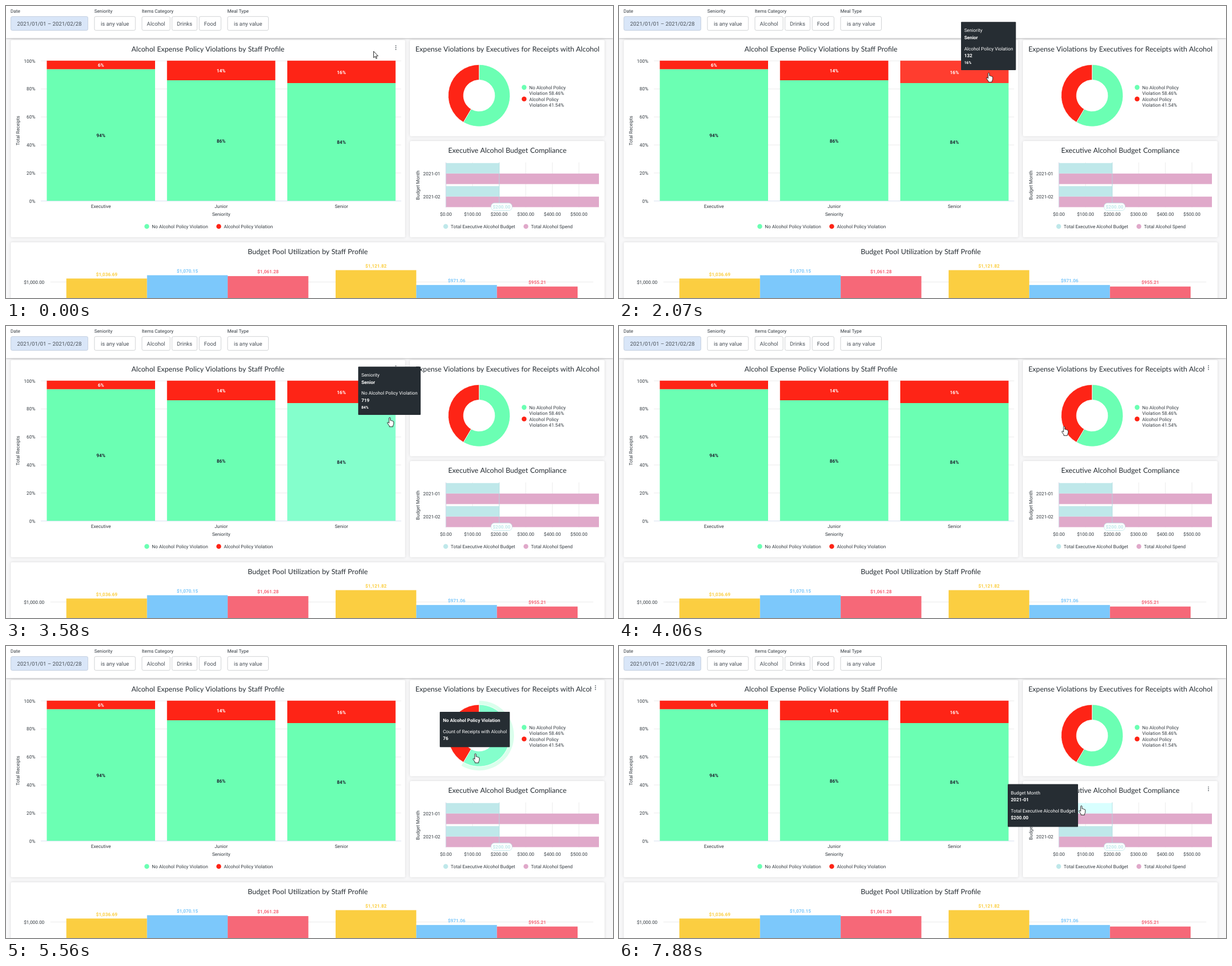
These frames come from a looping animation (1079 by 519 pixels, 8000 ms). An HTML page:

```html
<!DOCTYPE html>
<html lang="en">
<head>
<meta charset="utf-8">
<title>Expense dashboard</title>
<style>
html, body { margin: 0; width: 100%; height: 100%; overflow: hidden; background: #f8f8f9; }
svg { display: block; width: 1079px; height: 519px; }
text { font: 400 8.33px Roboto, Arial, sans-serif; fill: #333a40; text-rendering: geometricPrecision; }
.title { font: 400 12.6px Lato, "Open Sans", sans-serif; word-spacing: .5px; fill: #262d33; }
.chip { font-size: 9.72px; fill: #4a5158; }
.bold { font-weight: 700; }
.mid { text-anchor: middle; }
.end { text-anchor: end; }
.tip { fill: #fff; }
.small { font-size: 6.8px; }
.card { fill: #fff; filter: drop-shadow(0 0 2.5px rgba(0, 0, 0, .13)); }
.head { fill: #fff; filter: drop-shadow(0 1px 1.5px rgba(0, 0, 0, .25)); }
</style>
</head>
<body>
<svg id="stage" viewBox="0 0 1079 519">
  <defs><clipPath id="cut"><rect id="cutBox" y="60" height="40" width="1079"/></clipPath></defs>
</svg>
<script>
const LOOP = 8000;
const GREEN = '#6bffb3', RED = '#fe2416', TEAL = '#bfe8ea', PINK = '#e0a9ca';
const GREEN_HI = '#84ffcc', RED_HI = '#ff3d2f', TEAL_HI = '#d8ffff';
const GRID = '#e6e6e6';
const stage = document.getElementById('stage');

const rect = (x, y, x2, y2, fill, more = '') =>
  `<rect x="${x}" y="${y}" width="${x2 - x}" height="${y2 - y}" fill="${fill}" ${more}/>`;
const line = (x, y, x2, y2, color = GRID) =>
  `<line x1="${x}" y1="${y}" x2="${x2}" y2="${y2}" stroke="${color}" stroke-width=".8"/>`;
const text = (x, y, str, cls = '', more = '') =>
  `<text x="${x}" y="${y}" class="${cls}" ${more}>${str}</text>`;
const dot = (x, y, fill) => `<circle cx="${x}" cy="${y}" r="4.3" fill="${fill}"/>`;
const card = (x, y, x2, y2) => rect(x, y, x2, y2, '#fff', 'rx="2.5" class="card"');
const turned = (x, y, str) => text(0, 0, str, 'mid', `transform="translate(${x} ${y}) rotate(-90)"`);

// Ring segment between two fractions of a full turn
function ring(r1, r2, from, to) {
  const at = (r, f) => {
    const a = f * 2 * Math.PI;
    return `${841 + r * Math.sin(a)} ${159.2 - r * Math.cos(a)}`;
  };
  const big = to - from > .5 ? 1 : 0;
  return `M${at(r2, from)}A${r2} ${r2} 0 ${big} 1 ${at(r2, to)}` +
    `L${at(r1, to)}A${r1} ${r1} 0 ${big} 0 ${at(r1, from)}Z`;
}

function filters() {
  const chip = (x, x2, str, on) =>
    rect(x, 18.7, x2, 43.3, on ? '#d9e6f8' : '#fff', `rx="2.5" stroke="${on ? '#b9c6d8' : '#c4c7ca'}" stroke-width=".8"`) +
    text((x + x2) / 2, 34.6, str, 'chip mid');
  return rect(0, -10, 1079, 57, '#fff', 'class="head"') +
    [[8, 'Date'], [157, 'Seniority'], [241.3, 'Items Category'], [393.5, 'Meal Type']]
      .map(([x, s]) => text(x, 11.8, s)).join('') +
    chip(8.7, 145.6, '2021/01/01 – 2021/02/28', true) +
    chip(157.2, 230, 'is any value') + chip(241.7, 291.6, 'Alcohol') +
    chip(295, 339.7, 'Drinks') + chip(343.4, 382.2, 'Food') + chip(393.9, 466.5, 'is any value');
}

function profileChart() {
  let s = card(8.5, 60.5, 709.5, 411) +
    text(359, 81, 'Alcohol Expense Policy Violations by Staff Profile', 'title mid');
  for (let i = 0; i <= 5; i++) {
    const y = 346.6 - i * 49.8;
    s += line(62, y, 702.5, y, i ? GRID : '#ccd6eb') + text(52, y + 3, i * 20 + '%', 'end');
  }
  const bars = [[72.5, 112.3, 6, 'Executive'], [286.2, 132, 14, 'Junior'], [500, 137, 16, 'Senior']];
  bars.forEach(([x, y, bad, name], i) => {
    const mid = x + 96.2, last = i === 2;
    s += rect(x, y, x + 192.5, 346.3, GREEN, last ? 'id="okBar"' : '') +
      rect(x, 97.2, x + 192.5, y, RED, last ? 'id="badBar"' : '') +
      text(mid, (97.2 + y) / 2 + 3.4, bad + '%', 'bold mid', 'style="fill:#fff"') +
      text(mid, (y + 346.3) / 2 + 3.4, 100 - bad + '%', 'bold mid', 'style="fill:#1d2430"') +
      text(mid, 359.4, name, 'mid');
  });
  return s + turned(24.4, 221.5, 'Total Receipts') + text(382.5, 372.6, 'Seniority', 'mid') +
    dot(250.3, 391.8, GREEN) + text(259.2, 394.8, 'No Alcohol Policy Violation') +
    dot(378.2, 391.8, RED) + text(387.3, 394.8, 'Alcohol Policy Violation');
}

function donutChart() {
  const part = .5846;
  const slice = (id, from, to, fill) =>
    `<path id="${id}Halo" d="${ring(55, 62, from, to)}" fill="${fill}" opacity=".25"/>` +
    `<path id="${id}" d="${ring(27.8, 55, from, to)}" fill="${fill}" stroke="#fff" stroke-width=".8"/>`;
  return card(718, 60.5, 1064, 231.5) +
    `<g clip-path="url(#cut)">${text(891.4, 81, 'Expense Violations by Executives for Receipts with Alcohol', 'title mid')}</g>` +
    slice('okSlice', 0, part, GREEN) + slice('badSlice', part, 1, RED) +
    dot(921, 144.6, GREEN) + text(930, 148, 'No Alcohol Policy') + text(930, 158.3, 'Violation 58.46%') +
    dot(921, 165.2, RED) + text(930, 168.6, 'Alcohol Policy') + text(930, 179, 'Violation 41.54%');
}

function budgetChart() {
  let s = card(718, 240, 1064, 411) + text(891.2, 260.6, 'Executive Alcohol Budget Compliance', 'title mid');
  for (let i = 0; i <= 5; i++) {
    const x = 782 + i * 47.3;
    s += line(x, 278, x, 358) + text(x, 372.6, `$${i * 100}.00`, 'mid');
  }
  ['2021-01', '2021-02'].forEach((month, i) => {
    const y = 279.2 + i * 41;
    s += rect(782, y, 876.8, y + 18.6, TEAL, i ? '' : 'id="budgetBar"') +
      rect(782, y + 18.6, 1054, y + 37.3, PINK) + text(772, y + 21.6, month, 'end');
  });
  return s + line(782, 278, 782, 358, '#ccd6eb') + turned(735, 318.5, 'Budget Month') +
    line(876.8, 278, 876.8, 351, '#a9dde0') +
    rect(862.3, 350.2, 899.6, 363.6, '#fff', `rx="6" stroke="${TEAL}" stroke-width=".8"`) +
    text(880.9, 360, '$200.00', 'bold mid', `style="fill:${TEAL}"`) +
    dot(781.6, 391.8, TEAL) + text(790.6, 394.8, 'Total Executive Alcohol Budget') +
    dot(924.2, 391.8, PINK) + text(933.2, 394.8, 'Total Alcohol Spend');
}

function poolChart() {
  const colors = ['#fbce41', '#7cc8fb', '#f66878'];
  const values = [1036.69, 1070.15, 1061.28, 1121.82, 971.06, 955.21];
  let s = card(8.5, 420, 1064, 540) + text(536.5, 440.5, 'Budget Pool Utilization by Staff Profile', 'title mid') +
    line(79, 490.6, 1044, 490.6) + text(68.3, 493.6, '$1,000.00', 'end');
  values.forEach((v, i) => {
    const x = 107.3 + i * 143.4 + (i > 2 ? 48.4 : 0), y = 490.8 - (v - 1000) * .175, color = colors[i % 3];
    const label = '$' + v.toLocaleString('en-US', { minimumFractionDigits: 2 });
    s += rect(x, y, x + 143.4, 530, color) + text(x + 71.7, y - 4.8, label, 'bold mid', `style="fill:${color}"`);
  });
  return s;
}

const HAND = 'M-1.3 1.2Q-1.3 0 -.1 0T1.1 1.2V5.2Q2.4 4.6 3.1 5.8Q4.4 5.2 5 6.4Q6.9 6 6.9 8V11Q6.9 12.8 5.6 14.4V16.3H-.8V14.7' +
  'L-3.9 10.4Q-4.7 8.9 -3.6 8.3Q-2.7 8 -1.3 9.9Z';
const ARROW = 'M0 0V11.4L2.6 9L4.4 13L6 12.3L4.3 8.4H7.9Z';

stage.innerHTML += filters() + profileChart() + donutChart() + budgetChart() + poolChart() +
  '<g id="menu" fill="#5f666c">' + [-3.2, 0, 3.2].map(y => `<circle cy="${y}" r=".95"/>`).join('') + '</g>' +
  '<g id="tip"></g>' +
  `<g id="cursor" stroke="#111" stroke-width=".9" stroke-linejoin="round" fill="#fff">
    <path id="hand" d="${HAND}"/><path id="arrow" d="${ARROW}"/></g>`;

const el = {};
stage.querySelectorAll('[id]').forEach(n => { el[n.id] = n; });

// Pointer moves: first step, last step, number of steps, end point
const START = [653.5, 80.5];
const MOVES = [
  [590, 1000, 7, 657, 110], [1400, 1540, 3, 657, 113], [2000, 2560, 9, 660, 159.5],
  [3440, 4190, 12, 802, 180], [4720, 5000, 5, 812, 181], [5070, 5490, 7, 834, 191.5],
  [5560, 5630, 2, 835, 191.5], [6290, 6360, 2, 836, 192], [6840, 7530, 11, 822, 278],
  [7600, 7880, 5, 822, 284]
];
const HOVERS = [[0, ''], [794, 'badBar'], [2279, 'okBar'], [3644, ''], [4121, 'badSlice'],
  [5279, 'okSlice'], [7046, ''], [7599, 'budgetBar']];
const MENUS = [[0, 693, 74], [3712, 0, 0], [3780, 1047.8, 74], [7184, 1047.8, 253.8]];
const FILLS = {
  badBar: [RED, RED_HI], okBar: [GREEN, GREEN_HI], badSlice: [RED, RED_HI],
  okSlice: [GREEN, GREEN_HI], budgetBar: [TEAL, TEAL_HI]
};
// Tooltip size and lines; a star marks bold
const TIPS = {
  badBar: [97.5, 85.7, ['Seniority', '*Senior', 'Alcohol Policy Violation', '*132', '*16%']],
  okBar: [111, 85.7, ['Seniority', '*Senior', 'No Alcohol Policy Violation', '*719', '*84%']],
  badSlice: [124.5, 62.7, ['*Alcohol Policy Violation', 'Count of Receipts with Alcohol', '*54']],
  okSlice: [124.5, 62.7, ['*No Alcohol Policy Violation', 'Count of Receipts with Alcohol', '*76']],
  budgetBar: [125, 76, ['Budget Month', '*2021-01', 'Total Executive Alcohol Budget', '*$200.00']]
};

const latest = (list, t) => list.filter(item => item[0] <= t).pop();
const ease = s => s * s * (3 - 2 * s);

function pointer(t) {
  let [x, y] = START;
  for (const [from, to, n, x2, y2] of MOVES) {
    if (t < from) break;
    const step = Math.min(n, Math.floor((t - from) / (to - from) * (n - 1) + .01) + 1);
    const k = ease(step / n);
    x += (x2 - x) * k;
    y += (y2 - y) * k;
  }
  return [x, y];
}

function tooltip(key, x, y) {
  const [w, h, lines] = TIPS[key];
  const pie = key.endsWith('Slice');
  let left = x - .6 - w / 2, top = y - 4.8 - h;
  if (pie) { left = x - 1.2 - w / 2; top = y - 11.8 - h; }
  if (key === 'budgetBar') { left = x - 6 - w; top = y - .5 - h / 2; }
  const rows = pie ? [18, 37.5, 50.3] : [18, 30.5, 50.2, 62.6, 74.5];
  return rect(left, top, left + w, top + h, '#262d33', 'rx="1"') + lines.map((str, i) => {
    const cls = 'tip' + (str[0] === '*' ? ' bold' : '') + (i === 4 ? ' small' : '');
    return text(left + 5.6, top + rows[i], str.replace('*', ''), cls);
  }).join('');
}

function show(node, on) { node.setAttribute('visibility', on ? 'visible' : 'hidden'); }

function draw(t) {
  const [x, y] = pointer(t);
  const hover = latest(HOVERS, t)[1];
  const [, mx, my] = latest(MENUS, t);
  for (const id in FILLS) el[id].setAttribute('fill', FILLS[id][id === hover ? 1 : 0]);
  show(el.okSliceHalo, hover === 'okSlice');
  show(el.badSliceHalo, hover === 'badSlice');
  show(el.menu, mx > 0);
  el.menu.setAttribute('transform', `translate(${mx} ${my})`);
  el.cutBox.setAttribute('width', mx > 1000 && my < 100 ? 1041 : 1079);
  const waiting = hover === 'badSlice' && t < 4270;
  el.tip.innerHTML = hover && !waiting ? tooltip(hover, x, y) : '';
  const hand = hover || (t >= 4053 && t < 4130);
  show(el.hand, hand);
  show(el.arrow, !hand);
  el.cursor.setAttribute('transform', `translate(${x} ${y})`);
}

const begin = performance.now();
function tick() {
  draw((performance.now() - begin) % LOOP);
  requestAnimationFrame(tick);
}
tick();
</script>
</body>
</html>
```
